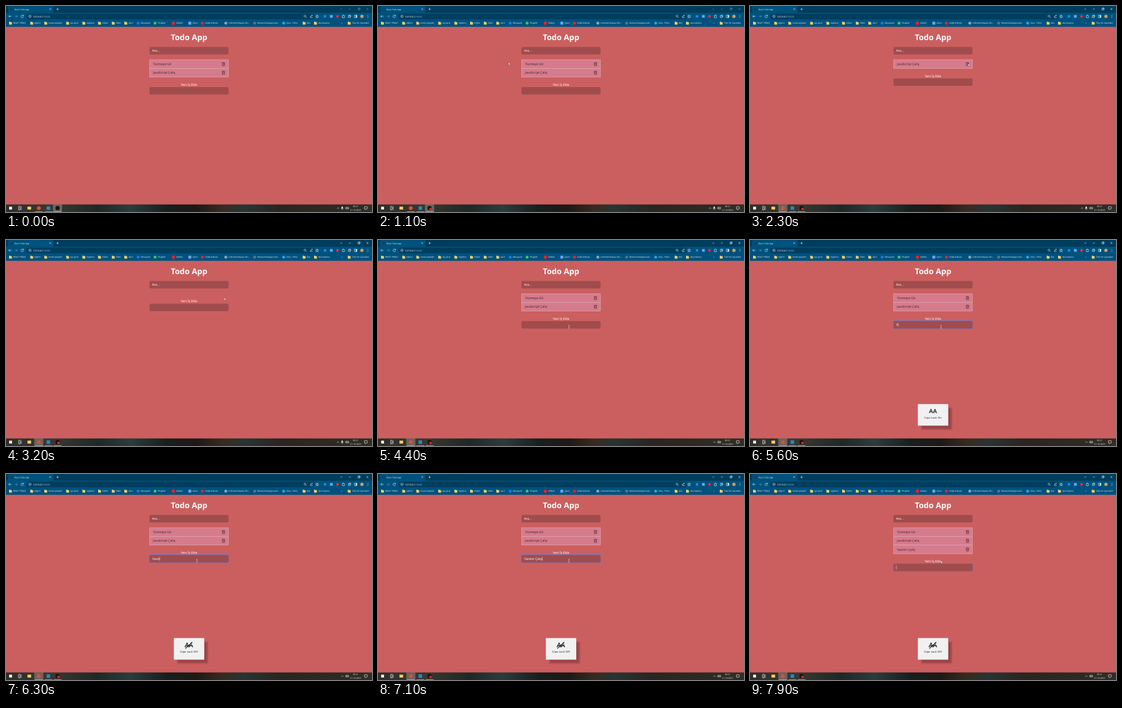
An HTML page that plays this animation: 600x338 px, repeating every 8000 ms.

```html
<!DOCTYPE html>
<html lang="tr">
<head>
<meta charset="utf-8">
<title>Todo App</title>
<style>
  html, body { margin: 0; width: 100%; height: 100%; overflow: hidden; background: #cb5f5f; }
  svg { display: block; width: 100vw; height: 100vh; }
  text { font-family: "Noto Sans", "Open Sans", sans-serif; text-rendering: geometricPrecision; white-space: pre; }
  .line { fill: none; stroke: #e4eef4; stroke-width: .65; }
  .small { font-size: 3.4px; fill: #e9f1f6; }
  .body { font-size: 5.2px; fill: #fff; }
  .item { font-size: 5.2px; fill: #43232f; }
  .osd { font-family: Lato, sans-serif; fill: #111; text-anchor: middle; }
</style>
</head>
<body>
<svg viewBox="0 0 600 338" preserveAspectRatio="none">
  <defs>
    <linearGradient id="bar">
      <stop offset="0" stop-color="#302e2a"/><stop offset=".13" stop-color="#38382f"/>
      <stop offset=".25" stop-color="#1d2927"/><stop offset=".34" stop-color="#293d3c"/>
      <stop offset=".44" stop-color="#161f1e"/><stop offset=".52" stop-color="#1d1916"/>
      <stop offset=".59" stop-color="#382a20"/><stop offset=".65" stop-color="#263533"/>
      <stop offset=".75" stop-color="#292521"/><stop offset="1" stop-color="#302e26"/>
    </linearGradient>
    <filter id="blur" x="-20%" y="-20%" width="140%" height="140%"><feGaussianBlur stdDeviation=".8"/></filter>
    <g id="folder"><path d="M0 .2h1.8l.7.8h2.2v4H0z" fill="#f6d264"/></g>
    <g id="trash" fill="none" stroke="#43232f" stroke-width=".6">
      <path d="M-2.6-1.9h5.2M-.9-2v-.7H.9v.7M-2-1.8l.3 4.5h3.4L2-1.8M-.7-.6v2M.7-.6v2"/>
    </g>
    <g id="row">
      <rect x="235.3" width="129.4" height="14.3" fill="#d67b8c" stroke="#e7b3bd" stroke-width=".55"/>
      <use href="#trash" x="356.5" y="7.2"/>
    </g>
  </defs>

  <!-- Browser window -->
  <rect id="strip" width="600" height="12" fill="#003d5d"/>
  <rect y="11" width="600" height="23.5" fill="#00527e"/>
  <path d="M2 11.2q1.5 0 1.5-1.5V2q0-1.7 1.7-1.7h71q1.7 0 1.7 1.7v7.7q0 1.5 1.5 1.5z" fill="#00527e"/>
  <circle cx="9.2" cy="5.3" r="2" fill="none" stroke="#25313a" stroke-width=".8"/>
  <text x="14" y="6.6" class="small">Basic Todo App</text>
  <path class="line" d="M71.3 3.9l2.4 2.4m0-2.4l-2.4 2.4M82.8 5.2h3.6m-1.8-1.8V7"/>
  <g id="controls"><path class="line" d="M548.2 4.3l1.4 1.4 1.4-1.4M562.2 5h3M577 3.9h2.6v2.6H577zM577.8 3.9v-.7h2.6v2.6h-.8M591.2 3.6l2.8 2.8m0-2.8l-2.8 2.8"/></g>

  <rect x="33" y="12.4" width="473" height="9.4" rx="4.7" fill="#003e60"/>
  <path class="line" d="M9 17H4.5m2-2l-2 2 2 2M28.6 16a2.1 2.1 0 1 0 .1 1.8m.1-3.2v1.7h-1.7"/>
  <path class="line" d="M14.3 17h4.5m-2-2l2 2-2 2" opacity=".45"/>
  <path class="line" d="M39.3 14.9a2 2 0 1 1-.01 0M39.3 16.7v1.4m0-2.4v.4M490.1 15a1.5 1.5 0 1 1-.01 0M491.3 17.7l1.6 1.6M499 16.2v2.8h3.3v-1M500 17.2q.3-1.8 2.3-1.8m-1-1l1.2 1-1.2 1M510 14.6l.7 1.6 1.7.2-1.3 1.1.4 1.8-1.5-.9-1.5.9.4-1.8-1.3-1.1 1.7-.2z"/>
  <text x="44.5" y="18.6" font-size="4.1" fill="#fff">127.0.0.1<tspan fill="#8aabc0">:5500</tspan></text>
  <rect x="521" y="15" width="4" height="4" fill="#1689d8"/>
  <rect x="531.2" y="14.8" width="4.4" height="4.4" fill="#6aa5ee"/>
  <circle cx="543.5" cy="17" r="2.3" fill="#d7343c"/>
  <path class="line" d="M551.4 15.7h1.1v-.8h1.2v.8h1.1v3.5h-3.4zM561.2 16h3v3h-3zM562 16v-1h3v3h-.8M571 15h4.2v4H571zM573.7 15v4"/>
  <path d="M573.7 15h1.5v4h-1.5z" fill="#e4eef4"/>
  <circle cx="583.5" cy="17" r="2.7" fill="#d99a55"/>
  <g fill="#e4eef4"><circle cx="593.2" cy="15.3" r=".5"/><circle cx="593.2" cy="17" r=".5"/><circle cx="593.2" cy="18.7" r=".5"/></g>
  <g id="bookmarks"></g>
  <text x="550" y="29.3" class="small">»</text>

  <!-- Page -->
  <rect y="34.4" width="600" height="292" fill="#cb5f5f"/>
  <text x="300" y="55.8" font-size="13" font-weight="600" fill="#fff" text-anchor="middle">Todo App</text>
  <rect x="235.2" y="67.2" width="129.6" height="12.3" rx="1.7" fill="#a04c4c"/>
  <text x="239.5" y="75.3" class="body">Ara...</text>
  <g id="list"></g>
  <g id="form">
    <text x="300" y="102.3" class="body" text-anchor="middle">Yeni İş Ekle</text>
    <rect id="glow" x="234.7" y="103.9" width="130.6" height="13.3" rx="2.1" fill="none" stroke="#7773bd" stroke-width="1.1"/>
    <rect x="235.2" y="104.4" width="129.6" height="12.3" rx="1.7" fill="#a04c4c"/>
    <text id="typed" x="239.5" y="112.5" class="body"></text>
    <path id="caret" d="M0 107.4v6.3" stroke="#fff" stroke-width=".5"/>
  </g>

  <!-- Caps lock popup -->
  <g id="popup">
    <rect x="281" y="275.5" width="49.7" height="35" fill="#8e3c3f" opacity=".75" filter="url(#blur)"/>
    <rect x="275.2" y="269.2" width="49.8" height="35.4" fill="#f1f1f1"/>
    <text id="capsOn" x="300" y="284.3" class="osd" font-size="9.2" font-weight="700">AA</text>
    <path id="capsOff" d="M293.3 284.3l3.5-7 3.3 7m-5.4-2.4h4.2M300.2 284.3l3-7 3 7m-4.8-2.4h3.8M294 286.3l11.5-10.3" fill="none" stroke="#111" stroke-width="1.1"/>
    <text id="capsText" x="300" y="292.7" class="osd" font-size="4.2" letter-spacing=".25"></text>
  </g>

  <!-- Taskbar -->
  <rect y="325.6" width="600" height="12.4" fill="url(#bar)"/>
  <rect id="active" y="325.6" width="15" height="12.4" fill="#fff" opacity=".24"/>
  <path d="M47.5 337.5h13M63 337.5h13M78 337.5h13" stroke="#86b9df" stroke-width=".9"/>
  <rect x="5.2" y="329.3" width="4.6" height="4.6" fill="#fff"/>
  <path class="line" d="M20.3 330.2h3.4v2.8h-3.4zM20.3 329v-.3h3.4v.3M20.3 334.2v.3h3.4v-.3M25 328.8v5.8"/>
  <rect x="35.2" y="329.2" width="6" height="4.8" fill="#f2cd62"/>
  <circle cx="53.8" cy="331.6" r="3.2" fill="#dc4c3b"/>
  <rect x="66.5" y="328.7" width="5.8" height="5.8" fill="#2489ca"/>
  <circle cx="84.5" cy="331.6" r="3.5" fill="#141417"/>
  <circle id="rec" cx="86" cy="333" r="2.1" fill="#e22531"/>
  <path id="chevron" class="line" d="M-1.6 332.5l1.6-1.6 1.6 1.6"/>
  <g id="mic"><rect x="550.2" y="328.9" width="2" height="3.4" rx="1" fill="#fff"/><path class="line" d="M549.4 331.4q.2 1.9 1.8 1.9t1.8-1.9M551.2 333.3v1.2"/></g>
  <path class="line" d="M556.6 330.8h1l1.4-1.2v4l-1.4-1.2h-1zM560 330.3q.8 1.3 0 2.6M561.2 329.5q1.3 2.1 0 4.2"/>
  <g class="small" text-anchor="middle"><text x="573" y="330.4">09:21</text><text x="573" y="336.2">21.10.2023</text></g>
  <path class="line" d="M587.6 329.3h4.6v3.7h-1.8l-1.2 1.3V333h-1.6z"/>

  <path id="arrow" d="M0 0v4.4l1-.9.8 1.7.8-.4-.8-1.6h1.4z" fill="#fff" stroke="#222" stroke-width=".35"/>
  <path id="beam" d="M-1-2.5Q0-2.5 0-1.8 0-2.5 1-2.5M0-1.8v3.6M-1 2.5Q0 2.5 0 1.8 0 2.5 1 2.5" fill="none" stroke="#f5e9e9" stroke-width=".55"/>
</svg>
<script>
const $ = id => document.getElementById(id);
const show = (id, on) => $(id).setAttribute("visibility", on ? "visible" : "hidden");
const move = (id, x, y) => $(id).setAttribute("transform", `translate(${x} ${y})`);

// Label, left edge of its icon, colour and form of the mark (none means folder)
const bookmarks = [
  ["REACT PROJE", 5], ["eğitim", 39.8], ["örnek projeler", 62.8], ["işe yarar", 98.7],
  ["ingilizce", 125.3], ["linkler", 151], ["Dibik", 173.5], ["okul", 194],
  ["Mossyard", 214.3, "#1977ec", 2.4], ["Pingloft", 242, "#36c95c", 2.4],
  ["Vidlark", 272, "#e9242b", .6], ["Çeviri", 299, "#6aa5ee", .6],
  ["Vidlark Music", 319.8, "#e9242b", 2.4], ["e-Hizmet Masası Hiz...", 358, "#8fa4b4", 2.4],
  ["Remove Background...", 405.2, "#56738a", 2.4], ["Giriş - Pelto", 452.8, "#22a6e0", 2.4],
  ["dini", 486.4], ["okul okuma", 505], ["Tüm Yer İşaretleri", 560.3]
];
$("bookmarks").innerHTML = bookmarks.map(([label, x, color, round]) =>
  (color ? `<rect x="${x}" y="25.8" width="4.8" height="4.8" rx="${round}" fill="${color}"/>`
         : `<use href="#folder" x="${x}" y="25.6"/>`) +
  `<text x="${x + 6.7}" y="29.4" class="small">${label}</text>`).join("");

const ROW = 14.25, TASK = "Yazılım Çalış";
$("list").innerHTML = ["Yüzmeye Git", "JavaScript Çalış", TASK].map(label =>
  `<g><use href="#row"/><text x="241" y="9.1" class="item">${label}</text></g>`).join("");
const rows = [...$("list").children];

const FOCUS = 2200, DELETE = 2700, RELOAD = 3500, CLICK = 4700, SUBMIT = 7500;
const keys = [5500, 5900, 6000, 6100, 6200, 6300, 6400, 6500, 6700, 6800, 6900, 7000, 7100];
const capsToggles = [5200, 5700, 6500, 6700];
// time, x, y of the pointer
const path = [[300, 85, 330], [1000, 214, 92.5], [1200, 214, 92.5], [1500, 285, 78],
  [1900, 355, 90], [2100, 357.8, 94.5], [3300, 357.8, 94.5], [4200, 313, 142.4]];

function pointer(t) {
  const i = path.findIndex(p => p[0] > t);
  if (i < 0) return path[path.length - 1].slice(1);
  if (!i) return path[0].slice(1);
  const [t0, x0, y0] = path[i - 1], [t1, x1, y1] = path[i];
  const u = (t - t0) / (t1 - t0), k = u * u * (3 - 2 * u);
  return [x0 + (x1 - x0) * k, y0 + (y1 - y0) * k];
}

function visibleRows(t) {
  if (t >= SUBMIT) return [0, 1, 2];
  if (t >= RELOAD || t < FOCUS) return [0, 1];
  return t < DELETE ? [1] : [];
}

function draw(t) {
  const focused = t >= FOCUS;
  $("controls").setAttribute("opacity", focused ? 1 : .4);
  $("active").setAttribute("x", focused ? 46.3 : 77);
  show("rec", t >= 500);
  show("mic", t < 4000);
  move("chevron", t < 4000 ? 544.3 : 551.5, 0);

  const shown = visibleRows(t);
  rows.forEach((row, i) => {
    const at = shown.indexOf(i);
    row.setAttribute("visibility", at < 0 ? "hidden" : "visible");
    row.setAttribute("transform", `translate(0 ${88.1 + at * ROW})`);
  });
  const shift = shown.length * ROW;
  move("form", 0, shift);

  const count = keys.filter(k => k <= t).length;
  $("typed").textContent = t < SUBMIT ? TASK.slice(0, count) : "";
  const lastInput = Math.max(CLICK, ...[...keys, SUBMIT].filter(k => k <= t));
  show("glow", t >= CLICK);
  show("caret", t >= CLICK && (t - lastInput) % 1000 < 500);
  move("caret", 239.8 + $("typed").getComputedTextLength(), 0);

  const toggles = capsToggles.filter(k => k <= t).length, caps = toggles % 2 === 1;
  show("popup", toggles);
  show("capsOn", caps);
  show("capsOff", toggles && !caps);
  $("capsText").textContent = caps ? "Caps Lock On" : "Caps Lock Off";

  const [x, y] = pointer(t), top = 104.4 + shift;
  const overInput = x > 235 && x < 365 && y > top && y < top + 12.3;
  show("arrow", t >= 300 && !overInput);
  show("beam", overInput);
  move("arrow", x, y);
  move("beam", x, y);
}

function frame() {
  draw(Math.floor(performance.now() % 8000 / 100) * 100);
  requestAnimationFrame(frame);
}
frame();
</script>
</body>
</html>
```
